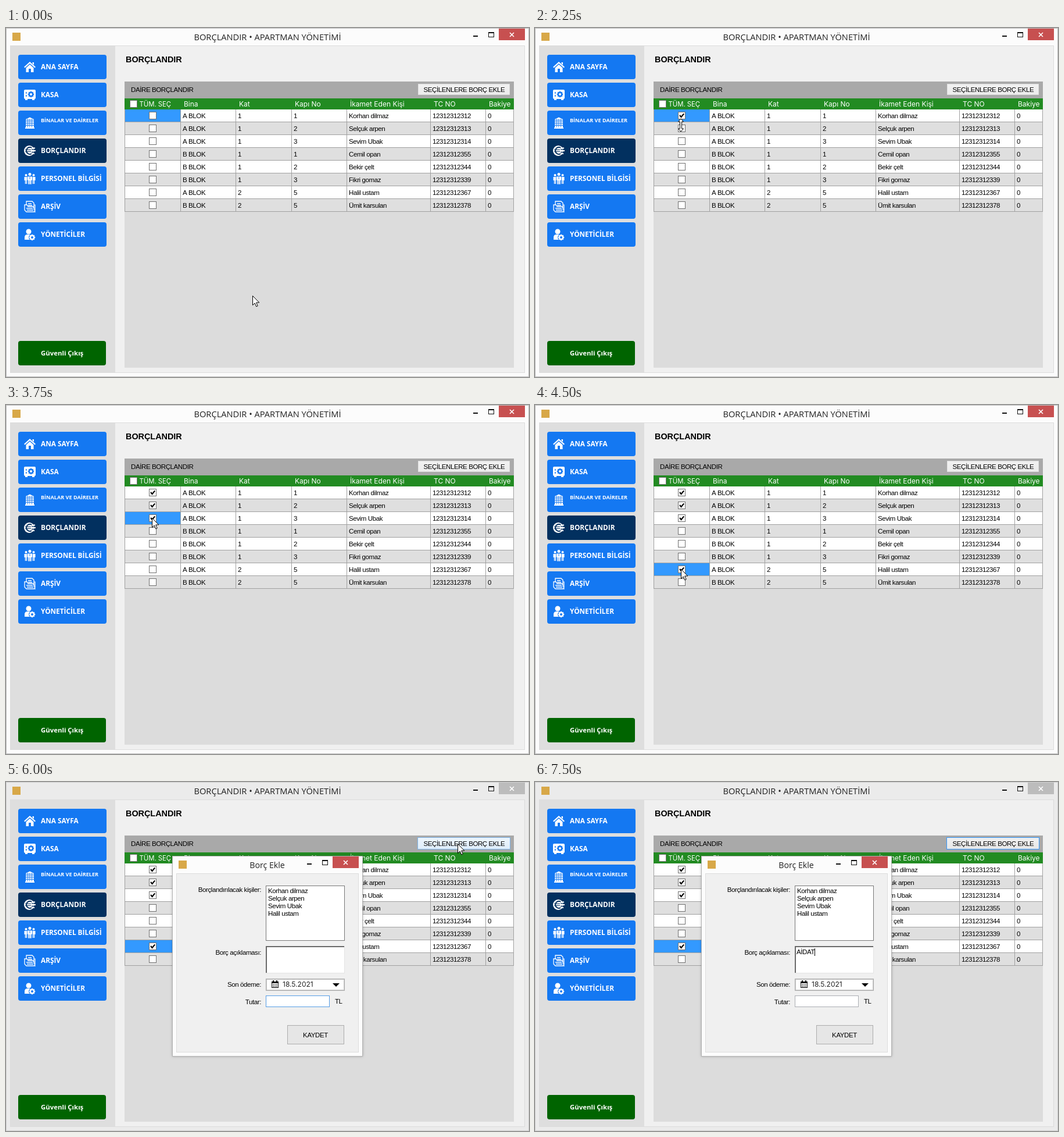
Write an HTML page with a canvas that moves like this. It is 900 px wide and 600 px high and loops after 8 s.

```html
<!DOCTYPE html>
<html lang="tr">
<head>
<meta charset="utf-8">
<title>Borçlandır</title>
<style>
html, body { margin: 0; width: 100%; height: 100%; overflow: hidden; background: #fcfcfc; }
canvas { display: block; width: 900px; height: 600px; }
</style>
</head>
<body>
<canvas id="stage" width="900" height="600"></canvas>
<script>
const ctx = document.getElementById('stage').getContext('2d');
const LOOP = 8000, STEP = 750;

const SANS = '11.5px "Liberation Sans", Arial, sans-serif';
const WIDE = '12px Inter, sans-serif';
const UI = '"Open Sans", "Noto Sans", sans-serif';
const BLUE = '#1478f2', NAVY = '#02305f', FOCUS = '#569de5';

const people = [
  ['A', 1, 1, 'Korhan dilmaz', '12312312312'],
  ['A', 1, 2, 'Selçuk arpen', '12312312313'],
  ['A', 1, 3, 'Sevim Ubak', '12312312314'],
  ['B', 1, 1, 'Cemil opan', '12312312355'],
  ['B', 1, 2, 'Bekir çelt', '12312312344'],
  ['B', 1, 3, 'Fikri gomaz', '12312312339'],
  ['A', 2, 5, 'Halil ustam', '12312312367'],
  ['B', 2, 5, 'Ümit karsulan', '12312312378']
];
const columns = [204, 300, 395, 491, 586, 730, 825, 873];
const headings = ['Bina', 'Kat', 'Kapı No', 'İkamet Eden Kişi', 'TC NO', 'Bakiye'];

// One state per step: checked rows, selected row, pointer and extras.
const all = people.map((_, i) => i);
const chosen = [0, 1, 2, 6];
const states = [
  { on: [], sel: 0, arrow: [424, 460] },
  { on: all, sel: 0, arrow: [222, 127], header: true },
  { on: [], sel: 0, arrow: [222, 127] },
  { on: [0], sel: 0, resize: [251, 167] },
  { on: [0, 1], sel: 1, arrow: [251, 172] },
  { on: [0, 1, 2], sel: 2, arrow: [251, 194] },
  { on: chosen, sel: 6, arrow: [251, 282] },
  { on: chosen, sel: 6, arrow: [766, 106], button: 'pressed' },
  { on: chosen, sel: 6, arrow: [777, 106], button: 'hover', dialog: true, amount: true },
  { on: chosen, sel: 6, beam: [500, 304], button: 'focus', dialog: true, note: '' },
  { on: chosen, sel: 6, button: 'focus', dialog: true, note: 'AİDAT' }
];

function rect(x, y, w, h, fill, stroke) {
  if (fill) { ctx.fillStyle = fill; ctx.fillRect(x, y, w, h); }
  if (stroke) {
    ctx.strokeStyle = stroke;
    ctx.lineWidth = 1;
    ctx.strokeRect(x + 0.5, y + 0.5, w - 1, h - 1);
  }
}

function round(x, y, w, h, r, fill) {
  ctx.fillStyle = fill;
  ctx.beginPath();
  ctx.roundRect(x, y, w, h, r);
  ctx.fill();
}

function text(str, x, y, font = SANS, color = '#000', align = 'left') {
  ctx.font = font;
  ctx.letterSpacing = font === SANS ? '-0.4px' : '0px';
  ctx.textAlign = align;
  ctx.fillStyle = color;
  ctx.fillText(str, x, y);
}

function shape(d, fill, stroke, width = 1) {
  const path = new Path2D(d);
  if (fill) { ctx.fillStyle = fill; ctx.fill(path); }
  if (stroke) { ctx.strokeStyle = stroke; ctx.lineWidth = width; ctx.stroke(path); }
}

function disc(x, y, r, fill) {
  ctx.fillStyle = fill;
  ctx.beginPath();
  ctx.arc(x, y, r, 0, 7);
  ctx.fill();
}

function at(x, y, draw) {
  ctx.save();
  ctx.translate(x, y);
  draw();
  ctx.restore();
}

function gear(x, y, r, color, hole) {
  at(x, y, () => {
    for (let i = 0; i < 4; i++) {
      rect(-1.2, -r, 2.4, r * 2, color);
      ctx.rotate(Math.PI / 4);
    }
  });
  disc(x, y, r * 0.75, color);
  disc(x, y, r * 0.38, hole);
}

// Icons are drawn in a 20 by 20 box.
const icons = {
  house() {
    shape('M0 10 L10 1 L20 10 L18.5 11.5 L10 4 L1.5 11.5Z M14.5 2H17V6.5L14.5 4Z', '#fff');
    shape('M3.5 11.5L10 5.7L16.5 11.5V19H12V13H8V19H3.5Z', '#fff');
  },
  safe() {
    round(0, 1, 20, 16, 2, '#fff');
    rect(2, 17, 4, 2, '#fff');
    rect(14, 17, 4, 2, '#fff');
    gear(12, 9, 5.2, BLUE, '#fff');
    rect(3, 5, 1.5, 3, BLUE);
    rect(3, 10, 1.5, 3, BLUE);
  },
  building() {
    shape('M3 4L10 0.5L17 4V18H3Z', '#fff');
    for (let y = 5; y < 17; y += 3) rect(3, y, 14, 1, BLUE);
    for (let x = 6; x < 16; x += 3.5) rect(x, 3, 0.8, 15, BLUE);
    rect(2, 18, 16, 2, '#fff');
  },
  debt() {
    disc(9, 10, 9, '#fff');
    shape('M14 5.5A6 6 0 1 0 14 14.5', null, NAVY, 2);
    shape('M2 8.5H12 M2 11.5H12', null, NAVY, 1.2);
    shape('M13 5.5H19 M12 10H20 M13 15H18', null, '#fff', 2);
    shape('M13 7.8H20 M13 12.5H20', null, NAVY, 1.3);
  },
  people() {
    for (const x of [3.5, 16.5]) {
      disc(x, 4, 2, '#fff');
      shape(`M${x - 3} 7H${x + 3}V13H${x + 1.7}V19H${x - 1.7}V13H${x - 3}Z`, '#fff');
      rect(x - 0.3, 13, 0.7, 6, BLUE);
    }
    disc(10, 2.5, 2.5, '#fff');
    shape('M5.5 6H14.5V13H13V20H7V13H5.5Z', '#fff', BLUE, 0.8);
    shape('M10 7V11 M10 13V20', null, BLUE, 0.9);
  },
  archive() {
    shape('M4 7V1H14L17 4V13 M7 5H13 M7 8H14', null, '#fff', 1.3);
    shape('M1 7H5L7 10H16L19 19H4L1 16Z M4 13H15 M5 16H16', null, '#fff', 1.3);
    shape('M17 7H19V17', null, '#fff', 1.2);
  },
  manager() {
    disc(8, 5, 4.5, '#fff');
    shape('M1 19V15Q1 10 6 10H10Q14 10 14 14V19Z', '#fff');
    disc(14, 15, 6, BLUE);
    gear(14, 15, 5.2, '#fff', BLUE);
  }
};

const menu = [
  ['ANA SAYFA', 'house'], ['KASA', 'safe'], ['BİNALAR VE DAİRELER', 'building'],
  ['BORÇLANDIR', 'debt'], ['PERSONEL BİLGİSİ', 'people'], ['ARŞİV', 'archive'],
  ['YÖNETİCİLER', 'manager']
];

function sidebar() {
  rect(8, 31, 180, 561, '#dedede');
  menu.forEach(([label, icon], i) => {
    const y = 46 + i * 48, small = i === 2;
    round(21, y, 152, 42, 4, icon === 'debt' ? NAVY : BLUE);
    at(31, y + 11, icons[icon]);
    text(label, 60, y + (small ? 120 - 100 : 25), `bold ${small ? 9.1 : 11.8}px ${UI}`, '#fff');
  });
  round(21, 538, 151, 42, 4, '#006400');
  text('Güvenli Çıkış', 60, 563, `bold 11.4px ${UI}`, '#fff');
}

// Window buttons, placed by the left edge of the close box.
function controls(x, y, active) {
  rect(x, y, 45, 20, active ? '#c75050' : '#bcbcbc');
  shape(`M${x + 19} ${y + 7}l7 7m0 -7l-7 7`, null, '#fff', 1.6);
  rect(x - 44, y + 12, 8, 2, '#111');
  rect(x - 18, y + 6, 10, 9, null, '#111');
  rect(x - 18, y + 6, 10, 2, '#111');
}

function checkbox(x, y, on, hot) {
  rect(x, y, 13, 13, hot ? '#eaf4ff' : '#fff', hot ? '#3c8fdc' : '#707070');
  if (on) shape(`M${x + 3} ${y + 6}l2.6 3l4.6 -5.6`, null, '#000', 2.1);
}

function addButton(mode) {
  const looks = {
    pressed: ['#daecfc', '#b9dcf8', FOCUS],
    hover: ['#edf5fd', '#dfeefb', '#7eb4ea'],
    focus: ['#f0f0f0', '#e7e7e7', '#3399ff']
  };
  const [top, bottom, edge] = looks[mode] || ['#f1f1f1', '#ececec', '#e0e0e0'];
  const fill = ctx.createLinearGradient(0, 96, 0, 115);
  fill.addColorStop(0, top);
  fill.addColorStop(1, bottom);
  if (mode) rect(708, 95, 160, 21, fill, edge);
  else rect(709, 96, 158, 19, fill, edge);
  text('SEÇİLENLERE BORÇ EKLE', 718.5, 110);
}

function table(state) {
  rect(204, 92, 670, 492, '#dcdcdc');
  rect(204, 92, 670, 29, '#a9a9a9');
  text('DAİRE BORÇLANDIR', 215, 110);
  addButton(state.button);

  rect(204, 121, 670, 19, '#228b22');
  checkbox(213, 124, state.header, state.header);
  text('TÜM. SEÇ', 229.5, 135, '11.3px Inter, sans-serif', '#fff');
  headings.forEach((h, i) => text(h, columns[i + 1] + 6, 135, WIDE, '#fff'));

  people.forEach(([block, floor, door, name, id], i) => {
    const y = 140 + i * 22;
    rect(204, y, 670, 22, i % 2 ? '#dfdfdf' : '#fff');
    if (state.sel === i) rect(205, y, 95, 21, '#3399ff');
    rect(204, y + 21, 670, 1, '#a0a0a0');
    checkbox(246, y + 4, state.on.includes(i));
    [block + ' BLOK', floor, door, name, id, 0]
      .forEach((value, c) => text(value, columns[c + 1] + 4, y + 15));
  });
  columns.forEach(x => rect(x, 140, 1, 176, '#a0a0a0'));
}

function mainWindow(state) {
  const active = !state.dialog;
  rect(0, 0, 900, 600, active ? '#fcfcfc' : '#ebebeb', active ? '#bdbdbd' : '#cfcfcf');
  rect(7, 30, 886, 563, '#f0f0f0', '#dcdcdc');
  rect(11, 8, 14, 14, '#d8a848');
  text('BORÇLANDIR • APARTMAN YÖNETİMİ', 450, 21, `14.65px ${UI}`, '#222', 'center');
  controls(848, 1, active);
  sidebar();
  text('BORÇLANDIR', 206, 59, 'bold 14.4px "Liberation Sans", Arial, sans-serif');
  table(state);
}

function dateField() {
  rect(447, 338, 136, 21, '#fff', '#adadad');
  rect(448, 339, 134, 19, null, '#c8c8c8');
  rect(457, 343, 12, 11, '#fff', '#111');
  rect(457, 343, 12, 3, '#111');
  rect(459, 341, 2, 3, '#111');
  rect(465, 341, 2, 3, '#111');
  for (let i = 0; i < 6; i++) rect(459 + i % 3 * 3, 348 + (i > 2) * 3, 2, 1.5, '#333');
  text('18.5.2021', 476, 352, WIDE, '#222');
  shape('M562 346H574L568 352Z', '#000');
}

function dialog(state) {
  ctx.save();
  ctx.shadowColor = 'rgba(0,0,0,.25)';
  ctx.shadowBlur = 4;
  rect(286, 127, 328, 345, '#fcfcfc');
  ctx.restore();
  rect(286, 127, 328, 345, null, '#b4b4b4');
  rect(293, 157, 314, 308, '#f0f0f0', '#dcdcdc');
  rect(297, 135, 14, 14, '#d8a848');
  text('Borç Ekle', 449.5, 148, `14.2px ${UI}`, '#222', 'center');
  controls(562, 128, true);

  const labels = { 189: 'Borçlandırılacak kişiler:', 297: 'Borç açıklaması:', 352: 'Son ödeme:', 382: 'Tutar:' };
  for (const y in labels) text(labels[y], 439, +y, SANS, '#000', 'right');

  rect(447, 178, 136, 95, '#fff', '#777');
  chosen.forEach((row, i) => text(people[row][3], 451, 191 + i * 13));

  rect(447, 282, 136, 47, '#fff', '#e3e3e3');
  shape('M448 328V283H582', null, '#696969', 2);
  if (state.note !== undefined) {
    text(state.note, 450, 296);
    rect(450 + (state.note ? ctx.measureText(state.note).width : 0), 286, 1, 13, '#000');
  }

  dateField();
  rect(447, 367, 110, 20, '#fff', state.amount ? FOCUS : '#abadb3');
  text('TL', 566, 381);
  rect(484, 418, 98, 33, '#e6e6e6', '#acacac');
  text('KAYDET', 532.5, 439, SANS, '#000', 'center');
}

function pointer({ arrow, resize, beam }) {
  if (arrow) at(arrow[0] + 0.5, arrow[1] + 0.5, () =>
    shape('M0 0V16L3.7 12.5L6.2 18.4L8.7 17.3L6.2 11.5H11.3Z', '#fff', '#000'));
  if (resize) at(...resize, () =>
    shape('M0 -11L4.5 -6H1.5V6H4.5L0 11L-4.5 6H-1.5V-6H-4.5Z', '#fff', '#000'));
  if (beam) at(...beam, () =>
    shape('M-3 -8H-1L0 -7L1 -8H3 M0 -7V7 M-3 8H-1L0 7L1 8H3', null, '#000'));
}

function frame(now) {
  const state = states[Math.floor(now % LOOP / STEP)];
  mainWindow(state);
  if (state.dialog) dialog(state);
  pointer(state);
}

const start = performance.now();
function tick() {
  frame(performance.now() - start);
  requestAnimationFrame(tick);
}
tick();
</script>
</body>
</html>
```
